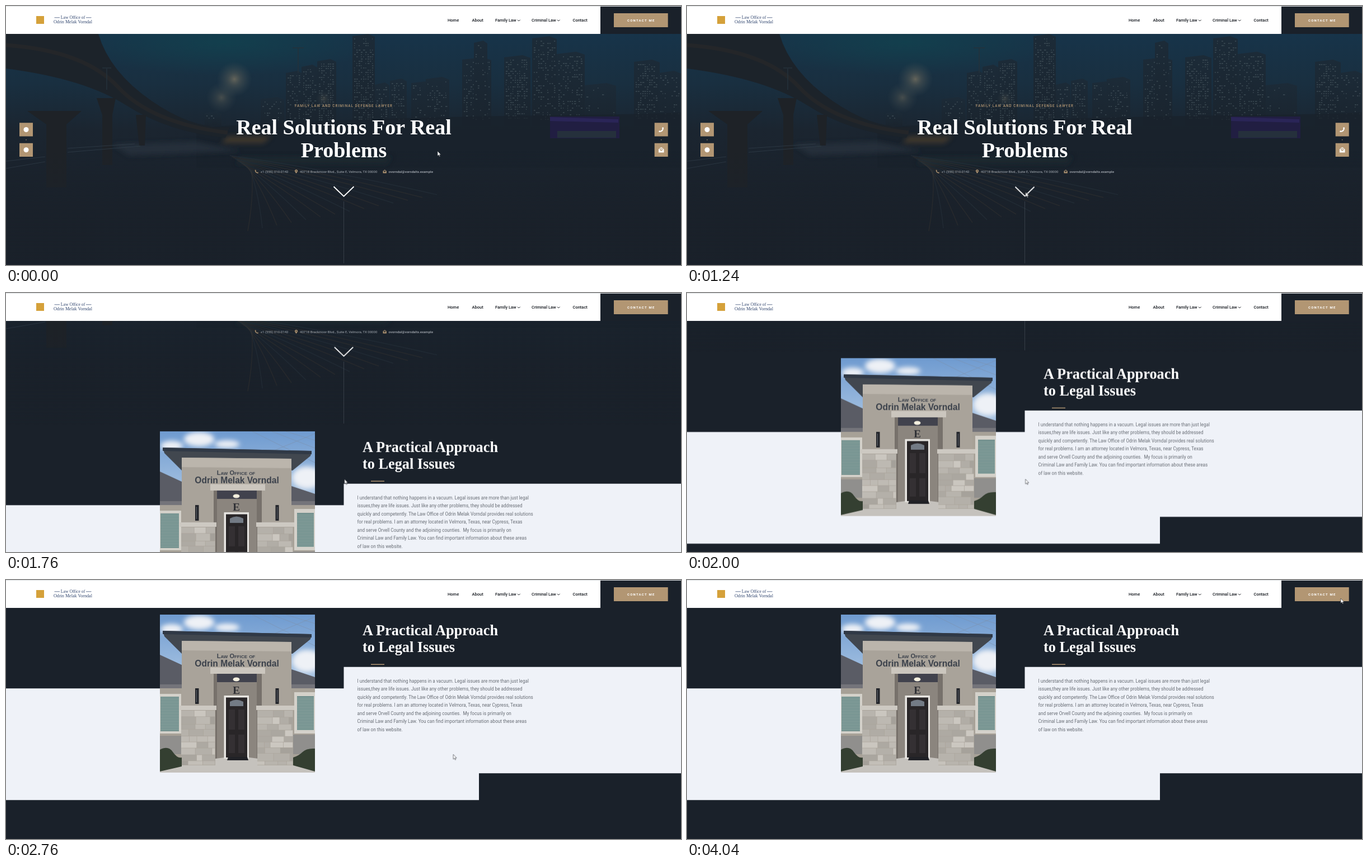
Animation, 1206 px wide and 464 px high, one loop 4080 ms. Source, as an HTML page:

```html
<!DOCTYPE html>
<html lang="en">
<head>
<meta charset="utf-8">
<title>Law office site scroll</title>
<style>
  html, body { margin: 0; width: 100%; height: 100%; overflow: hidden; background: #1a212a; }
  svg { display: block; width: 100%; height: 100%; }
  text { font-family: Roboto, sans-serif; white-space: pre; }
  .serif { font-family: "Liberation Serif", serif; }
  .title { font-weight: 700; fill: #fff; }
  .sign { font-family: "Liberation Sans", sans-serif; font-weight: 700; fill: #3b414b; text-anchor: middle; }
  .nav { font-size: 7.5px; font-weight: 500; fill: #15191f; }
  .info { font-size: 6.1px; fill: #aab0b7; }
  .body { font-size: 8.17px; fill: #686d75; }
  #arrow { transform-origin: 603.5px 332px; }
</style>
</head>
<body>
<svg viewBox="0 0 1206 464" preserveAspectRatio="none">
  <defs>
    <linearGradient id="sky" x2="0" y2="1">
      <stop offset=".1" stop-color="#17344a"/><stop offset=".3" stop-color="#192f40"/>
      <stop offset=".48" stop-color="#1b2530"/><stop offset=".85" stop-color="#1a212a"/>
    </linearGradient>
    <linearGradient id="tower" x2="0" y2="1">
      <stop offset="0" stop-color="#1c2b38"/><stop offset="1" stop-color="#1a242e"/>
    </linearGradient>
    <radialGradient id="teal">
      <stop offset="0" stop-color="#11434f" stop-opacity=".75"/><stop offset="1" stop-color="#11434f" stop-opacity="0"/>
    </radialGradient>
    <radialGradient id="glow">
      <stop offset="0" stop-color="#7d7663" stop-opacity=".75"/><stop offset=".35" stop-color="#5d6059" stop-opacity=".5"/>
      <stop offset="1" stop-color="#405056" stop-opacity="0"/>
    </radialGradient>
    <linearGradient id="fade" x2="0" y2="1">
      <stop offset="0" stop-color="#1a212a" stop-opacity="0"/><stop offset="1" stop-color="#1a212a"/>
    </linearGradient>
    <linearGradient id="day" x2="0" y2="1">
      <stop offset="0" stop-color="#6f9bd0"/><stop offset="1" stop-color="#b4cce6"/>
    </linearGradient>
    <filter id="soft" x="-20%" y="-40%" width="140%" height="180%"><feGaussianBlur stdDeviation="4"/></filter>
    <clipPath id="frame"><path d="M275 62H552V345H275Z"/></clipPath>
    <symbol id="phone" viewBox="0 0 10 10" overflow="visible">
      <path d="M.3 7.5 2.4 6.5 3.4 7.6Q6.2 6.1 7.5 3.4L6.4 2.5 7.4.3 9.7.8Q9.9 9.7.8 9.8Z"/>
    </symbol>
    <symbol id="mail" viewBox="0 0 10 10" overflow="visible">
      <path fill-rule="evenodd" d="M0 4 2 2.4V1.2H3.5L5 0 6.5 1.2H8V2.4L10 4V10H0ZM2.2 2.4V5.2L5 7.3 7.8 5.2V2.4ZM3 3.3H7V4H3ZM3 4.6H7V5.2H3Z"/>
    </symbol>
    <symbol id="pin" viewBox="0 0 10 10" overflow="visible">
      <path fill-rule="evenodd" d="M5 10Q1.3 5.3 1.3 3.7A3.7 3.7 0 0 1 8.7 3.7Q8.7 5.3 5 10ZM5 2.3A1.4 1.4 0 1 0 5 5.1 1.4 1.4 0 1 0 5 2.3Z"/>
    </symbol>
  </defs>

  <rect width="1206" height="464" fill="#1a212a"/>

  <g id="page">
    <g id="hero">
      <rect width="1206" height="464" fill="url(#sky)"/>
      <ellipse cx="390" cy="65" rx="270" ry="60" fill="url(#teal)"/>
      <g id="city"></g>
      <path d="M340 218Q620 200 960 196T1206 185V290H340Z" fill="#19222b" opacity=".75"/>
      <g filter="url(#soft)">
        <path d="M395 233H475L460 246H385Z" fill="#4b3c2d" opacity=".75"/>
        <path d="M190 248 340 243 420 260 220 268Z" fill="#273440" opacity=".7"/>
        <path d="M420 270H690L680 284H410Z" fill="#1e2d34" opacity=".6"/>
      </g>
      <path d="M972 198H1096V237H972Z" fill="#211e42"/>
      <path d="M972 199 1094 203V209L972 206Z" fill="#2a2557"/>
      <path d="M985 224H1090V236H985Z" fill="#25303c"/>
      <path d="M0 50H165Q185 118 260 170T400 217L392 236Q290 226 215 178T0 112Z" fill="#1c232a"/>
      <path d="M0 70Q140 80 200 145T396 227" fill="none" stroke="#29292a" stroke-width="7" opacity=".7"/>
      <path d="M38 188H135L108 212V325H72V212ZM162 165H196L190 195V285H172V195ZM232 195H250L248 250H238Z" fill="#1e2227"/>
      <path d="M110 255 230 247M110 262 240 251M0 278 70 270M0 291 70 279" stroke="#34414d" opacity=".7"/>
      <circle cx="408" cy="131" r="32" fill="url(#glow)"/>
      <circle cx="385" cy="164" r="28" fill="url(#glow)" opacity=".6"/>
      <circle cx="568" cy="166" r="15" fill="url(#glow)" opacity=".4"/>
      <path d="M180 112V150M172 111H188M522 76V120M512 75H532" stroke="#24323b" stroke-width="1.5"/>
      <rect y="260" width="1206" height="204" fill="url(#fade)"/>
      <g id="trails" fill="none"></g>

      <text x="516" y="181.3" font-size="6.28" font-weight="500" letter-spacing="1.08" fill="#b29673">FAMILY LAW AND CRIMINAL DEFENSE LAWYER</text>
      <g class="title" font-size="38" text-anchor="middle">
        <text class="serif" x="603.5" y="229.5">Real Solutions For Real</text>
        <text class="serif" x="603.5" y="270.5">Problems</text>
      </g>
      <g fill="#b29673">
        <use href="#phone" transform="matrix(-1 0 0 1 451 293.3)" width="6.5" height="6.5"/>
        <use href="#pin" x="515" y="293" width="7" height="7"/>
        <use href="#mail" x="673.5" y="293.3" width="6.3" height="6.3"/>
      </g>
      <text class="info" x="454.5" y="299">+1 (555) 010-0142</text>
      <text class="info" x="525" y="299">40718 Brackmoor Blvd., Suite E, Velmora, TX 00000</text>
      <text class="info" x="683.5" y="299" font-weight="500">ovorndal@vorndaltx.example</text>
      <path id="arrow" d="M585.5 323.5 603.5 341 621.5 323.5" fill="none" stroke="#fff" stroke-width="1.9"/>
      <path d="M603.5 350V461" stroke="#77808a" opacity=".3"/>
      <g fill="#b29673">
        <path d="M24 209.3h24v24.3h-24zM24 245.7h24v24.3h-24zM1158.7 209.3h24v24.3h-24zM1158.7 245.7h24v24.3h-24z"/>
        <circle cx="36" cy="239.7" r=".8"/><circle cx="1170.7" cy="239.7" r=".8"/>
      </g>
      <g fill="#fff">
        <circle cx="36" cy="221.5" r="4.5"/><circle cx="36" cy="257.8" r="4.5"/>
        <use href="#phone" x="1166" y="217" width="9.3" height="9.3"/>
        <use href="#mail" x="1166" y="253" width="9.5" height="9.5"/>
      </g>
    </g>

    <g id="about" transform="translate(0 413)">
      <path d="M0 194.3H603.5V155.7H1206V346.3H845V394.3H0Z" fill="#eff2f8"/>
      <g clip-path="url(#frame)">
        <rect x="275" y="62" width="277" height="140" fill="url(#day)"/>
        <g fill="#eef1f6" filter="url(#soft)">
          <ellipse cx="345" cy="76" rx="27" ry="13"/><ellipse cx="296" cy="88" rx="20" ry="9"/>
          <ellipse cx="395" cy="85" rx="22" ry="7"/><ellipse cx="538" cy="145" rx="27" ry="20"/>
        </g>
        <path d="M440 62 552 118M475 62 552 92M500 62 552 78M552 66 480 96" stroke="#7d90ac" stroke-width=".6"/>
        <path d="M275 134 316 153V190H275ZM510 160 552 174V188H510Z" fill="#5a5c65"/>
        <path d="M275 188H316V330H275ZM510 188H552V330H510Z" fill="#a7a197"/>
        <path d="M275 187H316V194H275ZM510 187H552V194H510Z" fill="#74747a"/>
        <path d="M275 204H313V275H275ZM515 201H552V275H515Z" fill="#d4d1ca"/>
        <path d="M276 209H309V271H276ZM520 208H550V269H520Z" fill="#6f8d8b"/>
        <g id="blinds" stroke="#9db3ad" stroke-width=".7"></g>
        <path d="M275 279H313V312H275ZM513 277H552V312H513Z" fill="#908f8d"/>
        <path d="M280 91 546 97 544 106 512 132H314L283 101Z" fill="#41474f"/>
        <path d="M280 91 546 97V103L280 97Z" fill="#303946"/>
        <path d="M314 109 510 111V330H314Z" fill="#a9a39a"/>
        <path d="M314 109 510 111V128L314 126Z" fill="#bbb5ac"/>
        <path d="M371 168H457V332H371Z" fill="#8b857e"/>
        <path d="M371 168H457L448 183H375Z" fill="#41424d"/>
        <path d="M371 168H377V325H371ZM448 168H457V325H448Z" fill="#77716b"/>
        <path d="M365 156.5H463V168H365Z" fill="#cbc6be"/>
        <ellipse cx="411.5" cy="178" rx="6" ry="3.5" fill="#f5f0df"/>
        <path d="M275 333 390 318H435L552 333V345H275Z" fill="#c5c2bd"/>
        <path d="M389.5 207H434V320H389.5Z" fill="#e8e6e2"/>
        <path d="M393 210.5H431V318H393Z" fill="#292628"/>
        <path d="M400 226V218Q411.5 211 424 218V226Z" fill="#737b85"/>
        <path d="M398 232H409V268H398ZM415 232H426V268H415ZM398 277H409V310H398ZM415 277H426V310H415Z" fill="#343033"/>
        <path d="M397 317H431L433 323H395Z" fill="#202126"/>
        <text class="serif" x="411.5" y="204" font-size="19" font-weight="700" text-anchor="middle" fill="#2d2e33">E</text>
        <path d="M338 194H344.5V222H338ZM481.5 194H487.5V222H481.5Z" fill="#22242a"/>
        <path d="M340.5 197V219M484.5 197V219" stroke="#646970"/>
        <path d="M313 233H374V332H313ZM449 233H513V332H449Z" fill="#aaa49b"/>
        <g id="stones"></g>
        <path d="M310 225H376V233H310ZM447 225H515V233H447Z" fill="#cdc9c2"/>
        <path d="M275 304Q290 296 298 308T314 318V334L275 343ZM552 302Q537 301 530 308T513 318V332L552 343Z" fill="#343f31"/>
        <text class="sign" x="411" y="140" font-size="11" style="font-variant:small-caps">Law Office of</text>
        <text class="sign" x="412.5" y="154.5" font-size="15.6">Odrin Melak Vorndal</text>
      </g>
      <g class="title" font-size="26.3">
        <text class="serif" x="637" y="99">A Practical Approach</text>
        <text class="serif" x="637" y="129">to Legal Issues</text>
      </g>
      <path d="M652 150.5H676V152H652Z" fill="#b29673"/>
      <g id="copy"></g>
    </g>
  </g>

  <g id="header">
    <rect width="1062" height="50" fill="#fff"/>
    <rect x="1062" width="144" height="50" fill="#1a212a"/>
    <rect width="1206" height="1" fill="#dde1e4"/>
    <rect x="54" y="18" width="14" height="14" fill="#d5a13a"/>
    <g fill="#31466f">
      <path d="M86.5 20.5H96V21.2H86.5ZM143 20.5H152.5V21.2H143Z"/>
      <text class="serif" x="119.5" y="23.3" font-size="7.7" text-anchor="middle">Law Office of</text>
      <text class="serif" x="119.5" y="31" font-size="8.1" text-anchor="middle">Odrin Melak Vorndal</text>
    </g>
    <g id="menu"></g>
    <path d="M914 24.7 916.3 27 918.6 24.7M985 24.7 987.3 27 989.6 24.7" fill="none" stroke="#15191f"/>
    <rect x="1086" y="13" width="96.7" height="25" fill="#b29673"/>
    <text x="1110" y="27.8" font-size="6" font-weight="700" letter-spacing="1.25" fill="#fff">CONTACT ME</text>
  </g>

  <path id="cursor" d="M0 0V8.6L2 6.8 3.4 9.8 4.6 9.2 3.3 6.4H6Z" fill="#fff" stroke="#22262c" stroke-width=".6"/>
</svg>

<script>
const LOOP = 4080;
const $ = id => document.getElementById(id);

function add(parent, tag, attrs, text) {
  const node = document.createElementNS('http://www.w3.org/2000/svg', tag);
  for (const key in attrs) node.setAttribute(key, attrs[key]);
  if (text) node.textContent = text;
  return $(parent).appendChild(node);
}

let seed = 11;
const random = () => (seed = (seed * 16807) % 2147483647) / 2147483647;

// Skyline: left, top, width, share of lit windows
const towers = [
  [355, 188, 30, .3], [455, 163, 42, .25], [500, 116, 30, .4], [528, 105, 28, .5], [556, 95, 34, .6],
  [619, 50, 40, .5], [659, 137, 26, .3], [686, 130, 30, .35], [724, 134, 50, .15], [750, 127, 42, .3],
  [815, 92, 52, .3], [836, 62, 24, .15], [890, 88, 47, .55], [940, 54, 44, .3], [984, 82, 50, .4],
  [1034, 138, 56, .05], [1122, 96, 46, .45], [1166, 116, 40, .2]
];
for (const [left, top, width, lit] of towers) {
  add('city', 'path', {
    d: `M${left} ${top + 4}L${left + width * .7} ${top}L${left + width} ${top + 5}V215H${left}Z`,
    fill: 'url(#tower)'
  });
  let windows = '';
  for (let y = top + 9; y < 205; y += 4)
    for (let x = left + 3; x < left + width - 4; x += 4)
      if (random() < lit) windows += `M${x} ${y}h${(1 + random() * 2.5).toFixed(1)}`;
  add('city', 'path', { d: windows, stroke: '#75858a', 'stroke-width': 1.2, opacity: .55 });
}

// Light trails fan out from the road's far end
for (let i = 0; i < 14; i++) {
  add('trails', 'path', {
    d: `M${400 + i * 3} ${268 + i * 2}Q${560 - i * 9} ${290 + i * 4} ${770 - i * 26} ${338 + i * 5}`,
    stroke: i % 3 ? '#3d3733' : '#2f3a44', 'stroke-width': 1.5, opacity: .4
  });
}

for (let y = 211; y < 270; y += 2.5) add('blinds', 'path', { d: `M276 ${y}H309M520 ${y}H550` });

for (const [left, right] of [[313, 374], [449, 513]]) {
  for (let y = 234, height; y < 331; y += height) {
    height = 7 + random() * 7;
    for (let x = left, width; x < right; x += width) {
      width = Math.min(10 + random() * 22, right - x);
      const tone = 164 + random() * 40;
      add('stones', 'rect', {
        x, y, width: Math.max(width - .7, 0), height: Math.min(height, 332 - y) - .7,
        fill: `rgb(${tone},${tone - 4},${tone - 11})`
      });
    }
  }
}

[
  'I understand that nothing happens in a vacuum. Legal issues are more than just legal',
  'issues,they are life issues. Just like any other problems, they should be addressed',
  'quickly and competently. The Law Office of Odrin Melak Vorndal provides real solutions',
  'for real problems. I am an attorney located in Velmora, Texas, near Cypress, Texas',
  'and serve Orvell County and the adjoining counties.  My focus is primarily on',
  'Criminal Law and Family Law. You can find important information about these areas',
  'of law on this website.'
].forEach((line, i) => add('copy', 'text', { class: 'body', x: 627.5, y: 184 + i * 14.45 }, line));

const menu = { Home: 789, About: 832.5, 'Family Law': 874, 'Criminal Law': 939, Contact: 1012.5 };
for (const label in menu) add('menu', 'text', { class: 'nav', x: menu[label], y: 28 }, label);

// Steps are [ms, x, y]
function move(id, steps) {
  $(id).animate(
    steps.map(([time, x, y]) => ({ offset: time / LOOP, transform: `translate(${x}px, ${y}px)` })),
    { duration: LOOP, iterations: Infinity }
  );
}

const scroll = [
  [0, 0], [1360, 0], [1440, 13], [1520, 47], [1600, 102], [1700, 182], [1800, 256], [1900, 315],
  [2000, 358], [2120, 393], [2240, 409], [2320, 412.3], [2400, 413], [LOOP, 413]
];
move('page', scroll.map(([time, y]) => [time, 0, -y]));
move('cursor', [
  [0, 771, 260], [160, 752, 267], [340, 698, 289], [480, 655, 307], [600, 632, 317], [760, 612, 329],
  [900, 605, 333.5], [2560, 604.5, 333.5], [2700, 700, 325], [2860, 960, 292], [2980, 1143, 257],
  [3100, 1212, 215], [3500, 1212, 90], [3660, 1194, 58], [3840, 1174, 39], [3980, 1168, 33], [LOOP, 1168, 33]
]);
$('arrow').animate(
  [1, .87, 1].map(size => ({ transform: `scale(${size})`, easing: 'ease-in-out' })),
  { duration: LOOP / 4, iterations: Infinity }
);
</script>
</body>
</html>
```
